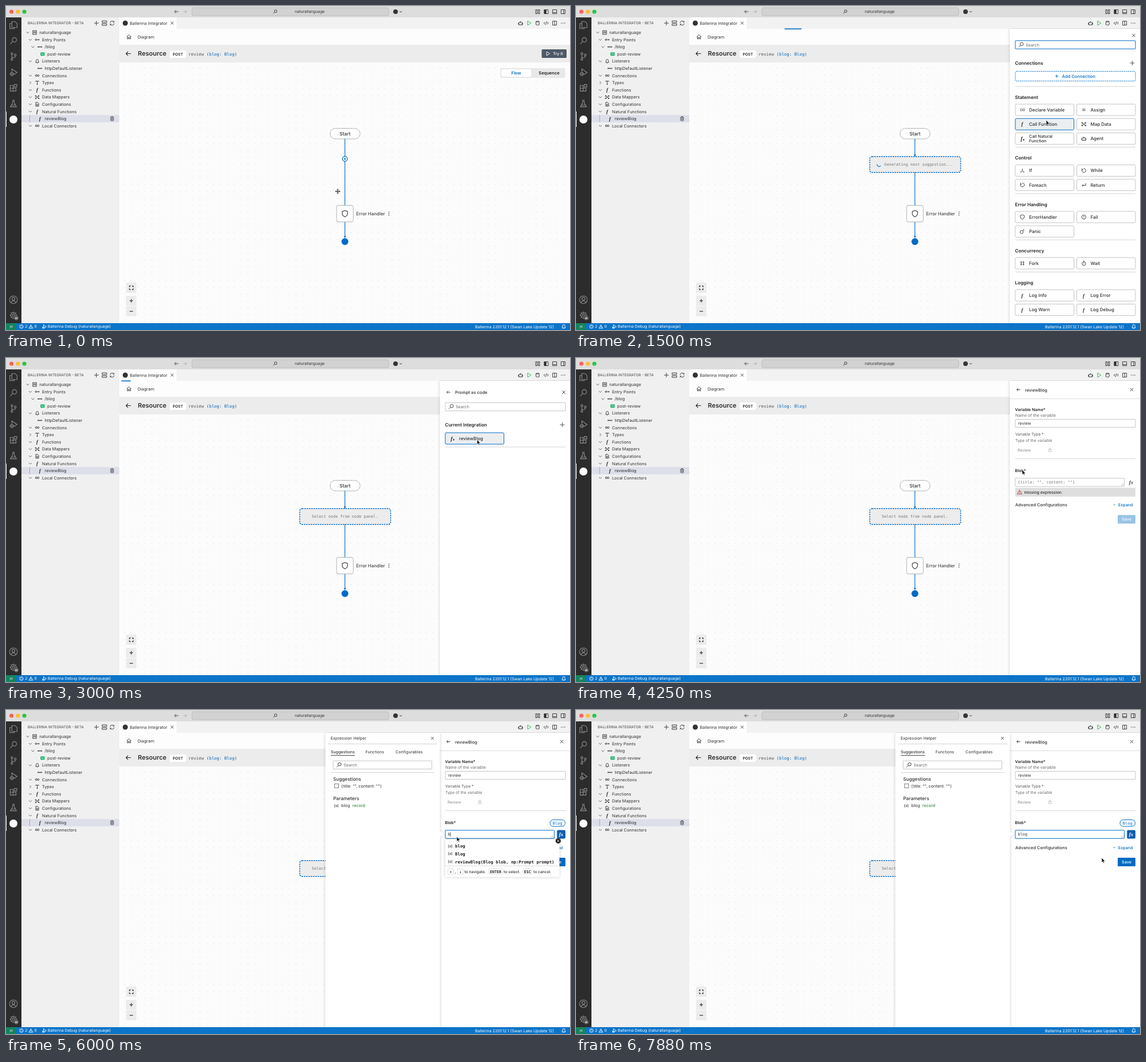
An HTML page for the animation above (8000 ms loop, 986x568 px).

```html
<!DOCTYPE html>
<html lang="en">
<head>
<meta charset="utf-8">
<title>Flow editor</title>
<style>
html, body { margin: 0; width: 100%; height: 100%; overflow: hidden; background: #fff; }
svg { display: block; width: 986px; height: 568px; font-family: Inter, sans-serif; text-rendering: geometricPrecision; }
text { white-space: pre; }
.mono { font-family: "DejaVu Sans Mono", monospace; }
.serif { font-family: "Liberation Serif", serif; font-style: italic; font-weight: 700; }
.m { font-weight: 500; }
.b { font-weight: 600; }
.mid { text-anchor: middle; }
</style>
</head>
<body>
<svg id="stage" viewBox="0 0 986 568">
  <defs>
    <pattern id="dots" x="201" y="103" width="12" height="12" patternUnits="userSpaceOnUse">
      <circle cx="6" cy="6" r=".65" fill="#dedede"/>
    </pattern>
    <filter id="shadow" x="-10%" y="-10%" width="120%" height="120%">
      <feDropShadow dx="0" dy="0" stdDeviation="2.5" flood-color="#000" flood-opacity=".22"/>
    </filter>
    <clipPath id="body"><rect x="198" y="39" width="788" height="517"/></clipPath>
  </defs>
  <g id="frame"></g>
  <g id="scene" clip-path="url(#body)"></g>
  <g id="pointer"></g>
</svg>
<script>
const LOOP = 8000, BLUE = '#006bc2', INK = '#303030', GREY = '#6a6a6a', EDGE = '#c4c4c4';

// Outlines centred on the origin
const ICONS = {
  down: 'M-2.5-1.2L0 1.3L2.5-1.2',
  right: 'M-1.2-2.5L1.3 0L-1.2 2.5',
  search: 'M-1 1L-4 4M4-1.2a2.8 2.8 0 1 1-5.6 0a2.8 2.8 0 1 1 5.6 0',
  plus: 'M-4 0H4M0-4V4',
  minus: 'M-3 0H3',
  close: 'M-2.7-2.7L2.7 2.7M2.7-2.7L-2.7 2.7',
  back: 'M4.2 0H-4M-.6-3.4L-4 0L-.6 3.4',
  forward: 'M-3.5 0H3.5M.5-3L3.5 0L.5 3',
  loop: 'M-2.8-1.8a3.4 3.4 0 1 0 2.3-1.6M-3.2-3.8v2.5h2.5',
  refresh: 'M-3.5-.5a3.5 3.5 0 0 1 6.5-1.5M3.3-3.8v2h-2M3.5.5a3.5 3.5 0 0 1-6.5 1.5M-3.3 3.8v-2h2',
  files: 'M-2-4.5h4l2.5 2.5v5h-6.5zM-2-2h-2.5v6.5h5.5v-1.5',
  branch: 'M-2-2.4V2.4M-2 1.2h2.5q1.8 0 1.8-2M-.8-3.6a1.2 1.2 0 1 1-2.4 0a1.2 1.2 0 1 1 2.4 0M-.8 3.6a1.2 1.2 0 1 1-2.4 0a1.2 1.2 0 1 1 2.4 0M3.5-2a1.2 1.2 0 1 1-2.4 0a1.2 1.2 0 1 1 2.4 0',
  debug: 'M-2-.5V-4L4.5.4L.8 2.8M-.2 2.3a1.8 2 0 1 1-3.6 0a1.8 2 0 1 1 3.6 0M-4.8 2.3h5.6',
  blocks: 'M-4-3h3.6v7H-4zM-4 .5H3.2V4H-4M1-4.2h3.2V-1H1z',
  flask: 'M-1.3-4h2.6M-.9-4v3L-3.8 4h7.6L.9-1v-3M-2.6 2h5.2',
  user: 'M4.5 0a4.5 4.5 0 1 1-9 0a4.5 4.5 0 1 1 9 0M1.7-1.2a1.7 1.7 0 1 1-3.4 0a1.7 1.7 0 1 1 3.4 0M-3 3.2q3-4 6 0',
  gear: 'M1.5 0a1.5 1.5 0 1 1-3 0a1.5 1.5 0 1 1 3 0M3.3 0a3.3 3.3 0 1 1-6.6 0a3.3 3.3 0 1 1 6.6 0M0-3.3v-1.4M0 3.3v1.4M3.3 0h1.4M-3.3 0h-1.4M2.3 2.3l1 1M-2.3-2.3l-1-1M2.3-2.3l1-1M-2.3 2.3l-1 1',
  project: 'M-3.7-3.7h7.4v7.4h-7.4zM-1.5-2v4M0-2v2.5M1.6-2v4',
  entry: 'M-1 0a1.5 1.5 0 1 1-3 0a1.5 1.5 0 1 1 3 0M-1 0H4M2.5-1.5L4 0L2.5 1.5',
  bell: 'M-3.3 2.3h6.6l-1-1.5v-2a2.3 2.3 0 0 0-4.6 0v2zM-.8 3.6h1.6',
  link: 'M-.2 0a1.7 1.7 0 1 1-3.4 0a1.7 1.7 0 1 1 3.4 0M3.6 0a1.7 1.7 0 1 1-3.4 0a1.7 1.7 0 1 1 3.4 0',
  type: 'M-3-2v-1.2h6V-2M0-3.2V3.2M-1.2 3.2h2.4',
  map: 'M-3.6-3h1.5v1.5h-1.5zM-3.6 1.5h1.5V3h-1.5zM2.1-3h1.5v1.5H2.1zM2.1 1.5h1.5V3H2.1zM-2-2.2L2 2.2M-2 2.2L2-2.2',
  config: 'M-2.8-3.8h3.6l2 2v5.6h-5.6zM1.3 1a1.3 1.3 0 1 1-2.6 0a1.3 1.3 0 1 1 2.6 0',
  trash: 'M-3-2.5h6M-1-2.5v-1.2h2v1.2M-2.3-2.5v6h4.6v-6M-.7-1v3M.7-1v3',
  robot: 'M-3-1.3h6v4.5h-6zM0-1.3v-2M-1 1v.6M1 1v.6M-4 .2v2M4 .2v2',
  run: 'M-2.5-3.8L3.5 0L-2.5 3.8z',
  data: 'M-2.8-2.7q2.8-1.8 5.6 0v5.4q-2.8 1.8-5.6 0zM-2.8-2.7q2.8 1.8 5.6 0',
  code: 'M-2-2L-4 0L-2 2M2-2L4 0L2 2M1-3L-1 3',
  split: 'M-3.5-3.5h7v7h-7zM0-3.5v7',
  bottom: 'M-3.5-3.5h7v7h-7zM-3.5 1.5h7',
  side: 'M-3.5-3.5h7v7h-7zM1-3.5v7',
  layout: 'M-3.5-3.5h2.5v7h-2.5zM1-3.5h2.5v2.5H1zM1 1h2.5v2.5H1z',
  home: 'M-3.8 0L0-3.6L3.8 0M-2.8-.8v4.4h1.9V1h1.8v2.6h1.9v-4.4',
  shield: 'M0-4L3.4-2.8V0Q3.2 2.8 0 4.2Q-3.2 2.8-3.4 0v-2.8z',
  fit: 'M-3.2-1v-2.2H-1M1-3.2h2.2V-1M3.2 1v2.2H1M-1 3.2h-2.2V1',
  assign: 'M-2.8-1.2h5.6M-2.8 1.2h5.6',
  fork2: 'M0-3.2V0L-2.6 2.6M0 0L2.6 2.6M-1.7 2.6h-1.8M1.7 2.6h1.8',
  ret: 'M3.2-3V.8h-6M-1-1L-2.8.8L-1 2.6',
  alert: 'M3.6 0a3.6 3.6 0 1 1-7.2 0a3.6 3.6 0 1 1 7.2 0M0-2v2.4M0 1.4v.6',
  bomb: 'M1.6 1a2.7 2.7 0 1 1-5.4 0a2.7 2.7 0 1 1 5.4 0M.8-1L3-3.2M1.5-3.6l2 2',
  fork: 'M-2-3.4v6.8M2-3.4v6.8M-3.4-2h2.8M.6-2h2.8M-3.4 2h2.8M.6 2h2.8',
  clock: 'M3.2.6a3.2 3.2 0 1 1-6.4 0a3.2 3.2 0 1 1 6.4 0M0 .6v-1.8M-1-3.8h2',
  warn: 'M0-3.6L4 3.4H-4zM0-1v2M0 1.8v.6',
  lock: 'M-2.5-.5h5v4h-5zM-1.5-.5v-1.2a1.5 1.5 0 0 1 3 0v1.2',
  remote: 'M-3-2.5L-.3 0L-3 2.5M3-3.2L.5-.8L3 1.6'
};

const rect = (x, y, w, h, fill, extra = '') =>
  `<rect x="${x}" y="${y}" width="${w}" height="${h}" fill="${fill}" ${extra}/>`;
const box = (x, y, w, h, fill, edge, r = 2) => rect(x, y, w, h, fill, `stroke="${edge}" rx="${r}"`);
const circle = (x, y, r, fill, extra = '') => `<circle cx="${x}" cy="${y}" r="${r}" fill="${fill}" ${extra}/>`;
const path = (d, stroke, w = 1, fill = 'none') =>
  `<path d="${d}" stroke="${stroke}" stroke-width="${w}" fill="${fill}"/>`;
// cy is the optical middle of the line of text
const text = (x, cy, str, size, fill = INK, cls = '') =>
  `<text x="${x}" y="${(cy + size * .36).toFixed(2)}" font-size="${size}" fill="${fill}" class="${cls}">${str}</text>`;
const icon = (name, x, y, color = INK, scale = 1, w = .9) =>
  `<g transform="translate(${x} ${y}) scale(${scale})">${path(ICONS[name], color, w / scale)}</g>`;
const fn = (x, y, size = 9, color = INK) => text(x, y, 'f', size, color, 'serif mid');
const variable = (x, y) => text(x, y - .3, '(x)', 6.6, INK, 'mid m');
const http = (x, y) => path(`M${x - 4} ${y}h8`, INK, 1.6) + path(`M${x - 1} ${y - 1.4}v2.8M${x + 1.5} ${y - 1.4}v2.8`, '#eee', .5);

function titleBar() {
  const lights = ['#fe5f57', '#febc2e', '#28c840'].map((c, i) => circle(9.5 + i * 11.3, 10, 3.6, c)).join('');
  const tools = ['layout', 'split', 'bottom', 'side'].map((n, i) => icon(n, 929.5 + i * 14.8, 10)).join('');
  return rect(0, 0, 986, 20, '#dddddd') + lights +
    icon('back', 298, 10, '#444', .85) + icon('forward', 313, 10, '#aaa', .85) +
    box(325, 3, 344, 14, '#d2d2d2', '#bdbdbd', 3) + icon('search', 470.5, 10, INK, .8) +
    text(505, 10, 'naturallanguage', 6.85) +
    circle(681, 10, 4, '#333') + icon('down', 690, 10, INK, .8) + tools + rect(941, 7, 3, 6.5, INK);
}

function activityBar() {
  const names = ['files', 'search', 'branch', 'debug', 'blocks', 'flask'];
  return rect(0, 20, 27, 536, '#2c2c2c') +
    names.map((n, i) => icon(n, 13, 33.5 + i * 27.5, '#8c8c8c', 1.4, 1.1)).join('') +
    rect(0, 185, 1, 27, '#fff') + circle(13, 199, 7, '#fff') +
    icon('user', 13, 515, '#8c8c8c', 1.5, 1.1) + icon('gear', 13, 542, '#8c8c8c', 1.4, 1.1) +
    circle(18, 547, 4.3, '#5a5a5a') + text(18, 547, 'BI', 4.5, '#fff', 'mid b');
}

function sideBar() {
  // indent level, chevron, icon, label
  const rows = [
    [0, 'down', 'project', 'naturallanguage'], [1, 'down', 'entry', 'Entry Points'], [2, 'down', 'http', '/blog'],
    [3, '', 'post', 'post-review'], [1, 'down', 'bell', 'Listeners'], [2, '', 'http', 'httpDefaultListener'],
    [1, 'down', 'link', 'Connections'], [1, 'right', 'type', 'Types'], [1, 'down', 'fn', 'Functions'],
    [1, 'down', 'map', 'Data Mappers'], [1, 'down', 'config', 'Configurations'],
    [1, 'down', 'fn', 'Natural Functions'], [2, '', 'fn', 'reviewBlog'], [1, 'down', 'link', 'Local Connectors']
  ];
  const tree = rows.map(([level, chevron, kind, label], i) => {
    const y = 46.5 + i * 12.58, x = 50 + level * 4.6;
    const mark = kind === 'fn' ? fn(x, y) : kind === 'http' ? http(x, y)
      : kind === 'post' ? rect(x - 3.6, y - 3, 7.4, 6, '#2fb573', 'rx="1"') + path(`M${x - 2} ${y - .8}l2 1.3l2-1.3`, '#fff', .7)
      : icon(kind, x, y, INK, .9);
    return (chevron ? icon(chevron, 38 + level * 4.5, y, '#555') : '') + mark + text(x + 8.3, y, label, 7.3);
  }).join('');
  return rect(27, 20, 171, 536, '#f0f0f0') + text(38, 30, 'BALLERINA INTEGRATOR - BETA', 6.3, '#444') +
    icon('plus', 158, 30) + path('M168 26h8v3h-8zM168 31h8v3h-8z', INK, .9) + icon('refresh', 185.5, 30) +
    rect(27, 191.2, 171, 12.6, '#dcdee8') + path('M41.5 191.2v12.6', '#aaa') + tree + icon('trash', 185.5, 197.5, '#444');
}

function editorHeader() {
  const tools = ['robot', 'run', 'data', 'code', 'split'].map((n, i) =>
    icon(n, 899.5 + i * 14.9, 30, n === 'run' ? '#2fae4f' : INK)).join('');
  return rect(198, 20, 788, 20, '#f2f2f2') + rect(198, 20, 100, 20, '#fff') +
    circle(208.5, 30, 4.5, '#333') + text(216.5, 30, 'Ballerina Integrator', 7.32) + icon('close', 290.5, 30, INK, .9) +
    tools + [-3, 0, 3].map(d => circle(974 + d, 30, .7, INK)).join('') +
    rect(198, 40, 788, 28, '#fdfdfd') + icon('home', 215, 54) + text(230, 54, 'Diagram', 7.36) +
    rect(198, 68, 788, 31, '#ececec') + icon('back', 214, 83.5, '#222', 1.05, 1.1) +
    text(230.5, 83.5, 'Resource', 11, INK, 'b') + rect(286.5, 78, 28, 13, '#fff', 'rx="2"') +
    text(300.5, 84.7, 'POST', 6.6, '#222', 'mid b') + text(319, 84.5, 'review', 7.45, '#555', 'mono') +
    text(350.5, 84.5, '(blog: Blog)', 7.4, '#0a68b4', 'mono') +
    rect(936.5, 76, 43.5, 15, '#4d5968', 'rx="1.5"') + icon('run', 947.5, 83.5, '#fff', .9) + text(956, 83.5, 'Try It', 7.2, '#fff', 'm');
}

function canvasArea() {
  const zoom = [['fit', 485, 18], ['plus', 508, 17.5], ['minus', 526.5, 17.5]].map(([n, y, h]) =>
    rect(210, y, 18, h, '#ececec') + icon(n, 219, y + h / 2, '#222', n === 'plus' ? .75 : 1, 1.1)).join('');
  return rect(198, 99, 788, 457, '#fcfcfc') + rect(198, 99, 788, 457, 'url(#dots)') +
    rect(864, 109, 113.5, 17, '#e8e8e8', 'rx="2"') + rect(866, 111, 52, 13, '#fff', 'rx="2"') +
    text(892, 117.5, 'Flow', 7.4, BLUE, 'mid b') + text(949.5, 117.5, 'Sequence', 7.5, '#222', 'mid b') + zoom;
}

function statusBar() {
  return rect(0, 556, 986, 12, '#0c74c9') + rect(0, 556, 18, 12, '#16825d') + icon('remote', 9, 562.5, '#fff', .8) +
    icon('alert', 27, 562, '#fff', .85) + text(33, 562, '2', 6.9, '#fff') + icon('warn', 43.5, 562, '#fff', .85) +
    text(49.5, 562, '0', 6.9, '#fff') + icon('debug', 67, 562, '#fff', .8) +
    text(73, 562, 'Ballerina Debug (naturallanguage)', 6.87, '#fff') +
    text(820, 562, 'Ballerina 2201.12.1 (Swan Lake Update 12)', 7.05, '#fff') + icon('bell', 975, 562, '#fff', .95);
}

const PLUS_CLICK = 640, PANEL_IN = 850, SUGGESTED = 2150, LIST_IN = 2450, FORM_IN = 3400,
  ERROR_IN = 3880, FOCUS = 5000, MENU_IN = 5630, TYPE_IN = 5880, MENU_OUT = 7200;

const PATH = [
  [0, 580, 325], [130, 580, 325], [500, 592, 268], [720, 592, 268], [1400, 822, 200], [1560, 822, 200],
  [2050, 824, 231], [2400, 824, 231], [2950, 823.5, 143], [3400, 823.5, 143], [4100, 780, 196],
  [4400, 780, 196], [4850, 788, 222], [6200, 788, 222], [6750, 791, 232], [7220, 791, 232],
  [7800, 919, 259], [LOOP, 919, 259]
];

function pointerAt(t) {
  const i = Math.max(1, PATH.findIndex(p => p[0] > t));
  const [t0, x0, y0] = PATH[i - 1], [t1, x1, y1] = PATH[i];
  const k = (t - t0) / (t1 - t0), e = k * k * (3 - 2 * k);
  return { x: x0 + (x1 - x0) * e, y: y0 + (y1 - y0) * e };
}

function pointer(t) {
  const { x, y } = pointerAt(t);
  const at = d => `<g transform="translate(${x.toFixed(2)} ${y.toFixed(2)})">${d}</g>`;
  if (t < 430) {
    return at('<path d="M0-4.6L2-2.5H.7V-.7H2.5V-2L4.6 0L2.5 2V.7H.7V2.5H2L0 4.6L-2 2.5H-.7V.7H-2.5V2L-4.6 0L-2.5-2V-.7H-.7V-2.5H-2z" fill="#111" stroke="#fff" stroke-width=".4"/>');
  }
  if (t < 760 || t > 6600 && t < 7280) {
    return at(path('M-.8 5V0q.9-1 1.7 0V3q.8-.6 1.5.2q.8-.4 1.4.4q1-.2 1.2.7V7L4 10H0L-2.8 6q0-1.4 1.2-.8z', '#111', .9, '#fff'));
  }
  return at(path('M0 0V8.4L1.9 6.7L3.2 9.6L4.6 9L3.3 6.2H5.9z', '#fff', .6, '#111'));
}

function diagram(t) {
  const arrow = y => path(`M590.8 ${y - 3}h3.4L592.5 ${y}z`, BLUE, .4, BLUE);
  const adding = t >= PLUS_CLICK;
  let out = box(566.5, 214.5, 52.5, 18.5, '#fff', '#b4b4b4', 9.2) + text(592.7, 223.5, 'Start', 8.4, INK, 'mid m') +
    path('M592.5 233V349M592.5 378.5V406', BLUE, 1.1) + arrow(406.5) + circle(592.5, 413, 6, BLUE) +
    box(578, 349.5, 29, 29, '#fff', '#b0b0b0', 3) + icon('shield', 592.5, 364, INK, 1.35, 1.1) +
    text(612, 364.5, 'Error Handler', 7.95, '#444', 'm') + [-3, 0, 3].map(d => circle(669.5, 364 + d, .8, INK)).join('');
  if (!adding) return out + circle(592.5, 268, 4.3, '#fff', `stroke="${BLUE}" stroke-width="1.2"`) + icon('plus', 592.5, 268, BLUE, .55, 1.2);
  out += arrow(263.5) + rect(513.5, 264, 159, 27.7, '#ececec', `rx="4" stroke="${BLUE}" stroke-width="1.4" stroke-dasharray="2.6 1.4"`);
  if (t >= SUGGESTED) return out + text(534.5, 277.5, 'Select node from node panel.', 6.88, '#777', 'mono');
  return out + `<g transform="translate(530 277.5) rotate(${((t - 1500) * .36).toFixed(1)})">${path('M-3.8 0A3.8 3.8 0 0 0 2.7 2.7', BLUE, 1.1)}</g>` +
    text(539, 277.5, 'Generating next suggestion...', 6.88, '#777', 'mono');
}

function progress(t) {
  const start = t >= 2980 ? 2980 : 620, end = t >= 2980 ? FORM_IN : SUGGESTED;
  if (t < start || t > end) return '';
  const p = (t - start) / 4000, unit = 788 * .02, w = unit * (1 + 4 * p);
  return rect((198 + unit * (50 * p + .5) - w / 2).toFixed(2), 39.4, w.toFixed(2), 1.6, BLUE);
}

const button = (x, y, label, mark, at) => {
  const hot = at.x > x && at.x < x + 102.5 && Math.abs(at.y - y) < 10.2;
  const lines = label.split('|');
  const glyph = mark === 'fn' ? fn(x + 12, y) : mark === 'var' ? variable(x + 12.5, y)
    : mark === 'np' ? fn(x + 11, y, 10) + icon('plus', x + 14.6, y + 2.2, INK, .4, .9) : icon(mark, x + 12.3, y);
  return box(x, y - 10, 102.5, 20, hot ? '#ebeef1' : '#fff', hot ? BLUE : EDGE) + glyph +
    lines.map((s, i) => text(x + 24, y + (lines.length > 1 ? i * 8.4 - 4 : 0), s, lines.length > 1 ? 7.4 : 7.95, INK, 'm')).join('');
};
const search = (x, y, w, edge) => box(x, y - 7.2, w, 14.4, '#fff', edge, .5) + icon('search', x + 10, y) + text(x + 18.3, y, 'Search', 7.1, '#666');
const rule = (y, x = 768, w = 210) => path(`M${x} ${y}h${w}`, '#d4d4d4');

function nodePanel(at) {
  const groups = [
    ['Statement', 160, [['Declare Variable', 'var'], ['Assign', 'assign'], ['Call Function', 'fn'], ['Map Data', 'map'], ['Call Natural|Function', 'np'], ['Agent', 'robot']]],
    ['Control', 266.5, [['If', 'fork2'], ['While', 'loop'], ['Foreach', 'loop'], ['Return', 'ret']]],
    ['Error Handling', 348, [['ErrorHandler', 'shield'], ['Fail', 'alert'], ['Panic', 'bomb']]],
    ['Concurrency', 429, [['Fork', 'fork'], ['Wait', 'clock']]],
    ['Logging', 485.3, [['Log Info', 'fn'], ['Log Error', 'fn'], ['Log Warn', 'fn'], ['Log Debug', 'fn']]]
  ];
  return icon('close', 975, 51.5) + search(768, 68, 210, BLUE) +
    text(767.5, 100, 'Connections', 8, '#222', 'b') + icon('plus', 972.5, 100, '#444') +
    rect(768, 114.5, 210, 17, '#fff', `rx="2" stroke="${BLUE}" stroke-dasharray="2 1.3"`) +
    icon('plus', 840.5, 123, BLUE, .7) + text(849.5, 123.5, 'Add Connection', 7.6, BLUE, 'm') +
    groups.map(([title, y, items]) => rule(y - 19) + text(767.5, y, title, 8.1, '#222', 'b') +
      items.map(([label, mark], i) => button(768 + i % 2 * 107.5, y + 22 + (i >> 1) * 25.2, label, mark, at)).join('')).join('');
}

function functionList(at) {
  return icon('back', 773.5, 60, INK, .75) + text(785, 60.5, 'Prompt as code', 7.55, INK, 'm') + icon('close', 975, 60) +
    search(768, 85.5, 210, EDGE) + text(767.5, 117.5, 'Current Integration', 8, '#222', 'b') + icon('plus', 972.5, 117, '#444') +
    button(768, 141, 'reviewBlog', 'np', at) + rule(156);
}

function form(t) {
  const focus = t >= FOCUS, typed = 'blog'.slice(0, Math.max(0, Math.floor((t - TYPE_IN) / 125) + 1));
  const error = t >= ERROR_IN && !typed, shift = error ? 16.2 : 0;
  let out = icon('back', 773.5, 55.5, INK, .75) + text(785, 56, 'reviewBlog', 7.35, INK, 'm') + icon('close', 971.5, 55.5) +
    path('M759 71.5H986', '#ddd') + text(767.5, 90, 'Variable Name*', 7, '#222', 'b') +
    text(768, 100.5, 'Name of the variable', 7.2, GREY) + box(768, 107.5, 210, 14, '#fff', EDGE, .5) + text(773, 114.5, 'review', 7.2) +
    text(768, 134, 'Variable Type *', 6.85, '#555') + text(768, 144.7, 'Type of the variable', 6.87, GREY) +
    text(772, 161.5, 'Review', 6.9, '#888') + icon('lock', 828.5, 161, '#bbb', .9) + rule(176.5) +
    text(767.5, 197.5, 'Blob*', 7.1, '#222', 'b') + box(768, 210.8, 190.5, 14.4, '#fff', focus ? BLUE : EDGE, .5) +
    (typed ? text(772.5, 218, typed, 6.9, INK, 'mono') : text(772.5, 218, '{title: "", content: ""}', 6.9, '#777', 'mono')) +
    path('M953 224l4-4M955.5 224l1.5-1.5', '#888', .6);
  if (focus) {
    out += box(951, 192.5, 26.5, 11.5, '#fff', BLUE, 5.7) + text(964.2, 198, 'Blog', 7, BLUE, 'mono mid') + rect(963.3, 210.5, 14.7, 15, '#0a5cb0', 'rx="2"');
    if ((t - FOCUS + 100) % 1060 < 530) out += rect(772.4 + typed.length * 4.15, 213.7, .7, 8.5, '#222');
  }
  out += text(970.6, 217.5, 'fx', 9, focus ? '#fff' : '#444', 'serif mid');
  if (error) out += rect(768, 227.5, 210, 15.5, '#dedede') + icon('warn', 775.5, 235, '#b5422a') + text(783.5, 235.5, 'missing expression', 7.15, INK, 'm');
  return out + text(768, 241.3 + shift, 'Advanced Configurations', 7.45, INK, 'm') + icon('down', 941, 241 + shift, '#3c83bd', .75) +
    text(948, 241.3 + shift, 'Expand', 7.15, BLUE, 'm') + rect(947, 259 + shift, 31, 15, error ? '#99c3e6' : BLUE, 'rx="1"') +
    text(962.5, 266.5 + shift, 'Save', 7.2, '#fff', 'm mid');
}

function completions() {
  const items = ['blog', 'Blog', 'reviewBlog(Blog blob, np:Prompt prompt)'].map((s, i) =>
    variable(776.5, 238.7 + i * 13.7) + text(785, 238.5 + i * 13.8, s, 7.4, '#222', 'mono b')).join('');
  const keys = [[772.5, 10, '↑'], [789.5, 10, '↓'], [844, 24, 'ENTER'], [904, 15.5, 'ESC']].map(([x, w, s]) =>
    box(x, 278.5, w, 9.5, '#fff', '#ddd', 1) + text(x + w / 2, 283.3, s, 6.6, '#222', 'mono b mid')).join('');
  return `<g filter="url(#shadow)">${rect(768, 227, 199.5, 65.5, '#fff')}</g>` + items + path('M768 273.3h199.5', '#ddd') + keys +
    text(784.5, 284, ',', 6.7) + text(801.5, 283.3, 'to navigate.', 6.7, INK, 'm') + text(870, 283.3, 'to select.', 6.7, INK, 'm') +
    text(922, 283.3, 'to cancel.', 6.7, INK, 'm') + circle(965.3, 229.5, 4.6, '#222') + icon('close', 965.3, 229.5, '#fff', .7);
}

function helper() {
  return `<g filter="url(#shadow)">${rect(558.5, 40, 200, 520, '#fff') + path('M758 212l6 5.5l-6 5.5z', 'none', 0, '#fff')}</g>` +
    text(567.5, 49.7, 'Expression Helper', 7.26) + icon('close', 745.5, 49.5, INK, .85) + rule(59.5, 563, 191) +
    text(567.8, 73, 'Suggestions', 7.05, INK, 'm') + text(628.5, 73, 'Functions', 7.1) + text(681, 73, 'Configurables', 7.13) +
    path('M568 79.5h42', '#333', .9) + search(572, 96.3, 172.5, EDGE) + rule(109.5, 568, 181) +
    text(572, 120.8, 'Suggestions', 8.2, INK, 'm') + rect(574.5, 129.5, 7, 7, '#fff', 'stroke="#666" stroke-width=".8"') +
    text(586, 133.7, '{title: "", content: ""}', 7.35) + text(572, 154.8, 'Parameters', 8.3, INK, 'm') +
    variable(577.5, 167.6) + text(586, 167.5, 'blog', 7.4) + text(605.5, 167.5, 'record', 7.3, '#1c7c2c');
}

function scene(t) {
  let out = diagram(t) + progress(t);
  if (t < PANEL_IN) return out;
  const at = pointerAt(t), slide = 228 * Math.pow(1 - Math.min(1, (t - PANEL_IN) / 200), 3);
  const content = t < LIST_IN ? nodePanel(at) : t < FORM_IN ? functionList(at) : form(t);
  out += `<g transform="translate(${slide.toFixed(2)} 0)"><g filter="url(#shadow)">${rect(758.5, 40, 240, 520, '#fff')}</g>${content}</g>`;
  if (t >= FOCUS) out += helper();
  if (t >= MENU_IN && t < MENU_OUT) out += completions();
  return out;
}

const $ = id => document.getElementById(id);
$('frame').innerHTML = canvasArea() + editorHeader() + sideBar() + activityBar() + titleBar() + statusBar();

let shown = '';
const begin = performance.now();
function draw() {
  const t = (performance.now() - begin) % LOOP, next = scene(t);
  if (next !== shown) $('scene').innerHTML = shown = next;
  $('pointer').innerHTML = pointer(t);
  requestAnimationFrame(draw);
}
draw();
</script>
</body>
</html>
```
